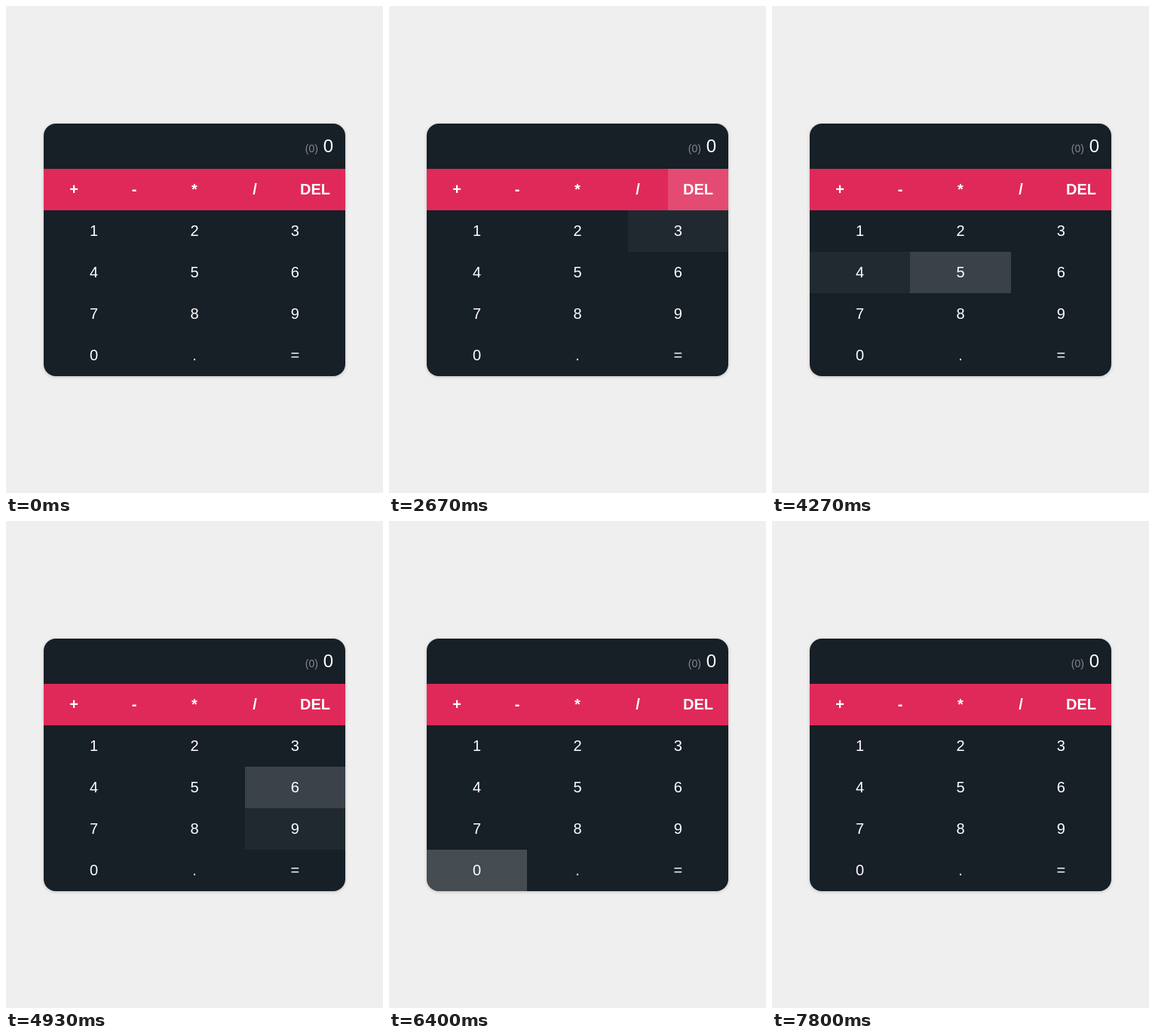
An HTML page for the animation above (9.39 s loop, 500 by 646 pixels).

```html
<!DOCTYPE html>
<html lang="en">
<head>
<meta charset="utf-8">
<title>Calculator</title>
<style>
  html, body { margin: 0; width: 100%; height: 100%; overflow: hidden; background: #efefef; }
  body { font-family: "Liberation Sans", Arial, sans-serif; color: #fff; }
  .card {
    position: absolute; left: 50px; top: 156px; width: 400px; height: 335px;
    border-radius: 16px; overflow: hidden; background: #171f27;
    box-shadow: 0 1px 4px rgba(0, 0, 0, .2);
  }
  .display { height: 28px; padding: 16px; line-height: 28px; font-size: 24px; text-align: right; }
  .display span { font-size: 14px; color: #888; }
  .row { display: flex; font-size: 20px; }
  .row div { flex: 1 1 0; height: 55px; line-height: 55px; text-align: center; }
  .ops { background: #df2959; font-weight: bold; }
</style>
</head>
<body>
<div class="card" id="card">
  <div class="display"><span>(0)</span> 0</div>
</div>
<script>
const LOOP = 9390, LAST = 7800, STEP = 200 / 3;
const FADE = 150, GLOW = 0.2;

// Pointer path: key and the moment it is entered; the last entry leaves the card.
const path = [
  ['+', 395], ['-', 1105], ['*', 1440], ['/', 1840], ['DEL', 2240],
  ['3', 2645], ['2', 2905], ['1', 3240],
  ['4', 3840], ['5', 4200], ['6', 4570],
  ['9', 4905], ['8', 5400], ['7', 5770],
  ['0', 6170], ['.', 6505], ['=', 6770], ['', 7370]
];

const card = document.getElementById('card');
const keys = {};

function addRow(labels, cls) {
  const row = document.createElement('div');
  row.className = 'row ' + cls;
  for (const label of labels) {
    const key = document.createElement('div');
    key.textContent = label;
    keys[label] = key;
    row.appendChild(key);
  }
  card.appendChild(row);
}

addRow(['+', '-', '*', '/', 'DEL'], 'ops');
['123', '456', '789', '0.='].forEach(s => addRow([...s], 'nums'));

// CSS "ease": cubic-bezier(.25, .1, .25, 1)
function ease(x) {
  if (x <= 0) return 0;
  if (x >= 1) return 1;
  const bez = (a, b, u) => 3 * a * u * (1 - u) ** 2 + 3 * b * u * u * (1 - u) + u ** 3;
  let lo = 0, hi = 1;
  for (let i = 0; i < 20; i++) {
    const mid = (lo + hi) / 2;
    if (bez(0.25, 0.25, mid) < x) lo = mid; else hi = mid;
  }
  return bez(0.1, 1, lo);
}

// The picture updates 15 times a second, on a 10 ms clock.
function tick(t) {
  const n = Math.floor((t + 5) / STEP);
  return Math.min(LAST, Math.round(n * STEP / 10) * 10);
}

function draw(t) {
  for (let i = 0; i < path.length - 1; i++) {
    const [label, enter] = path[i];
    const leave = path[i + 1][1];
    const lit = ease((t - enter) / FADE) - ease((t - leave) / FADE);
    keys[label].style.backgroundColor = `rgba(255, 255, 255, ${(GLOW * lit).toFixed(4)})`;
  }
}

const start = performance.now();
function loop() {
  draw(tick((performance.now() - start) % LOOP));
  requestAnimationFrame(loop);
}
loop();
</script>
</body>
</html>
```
